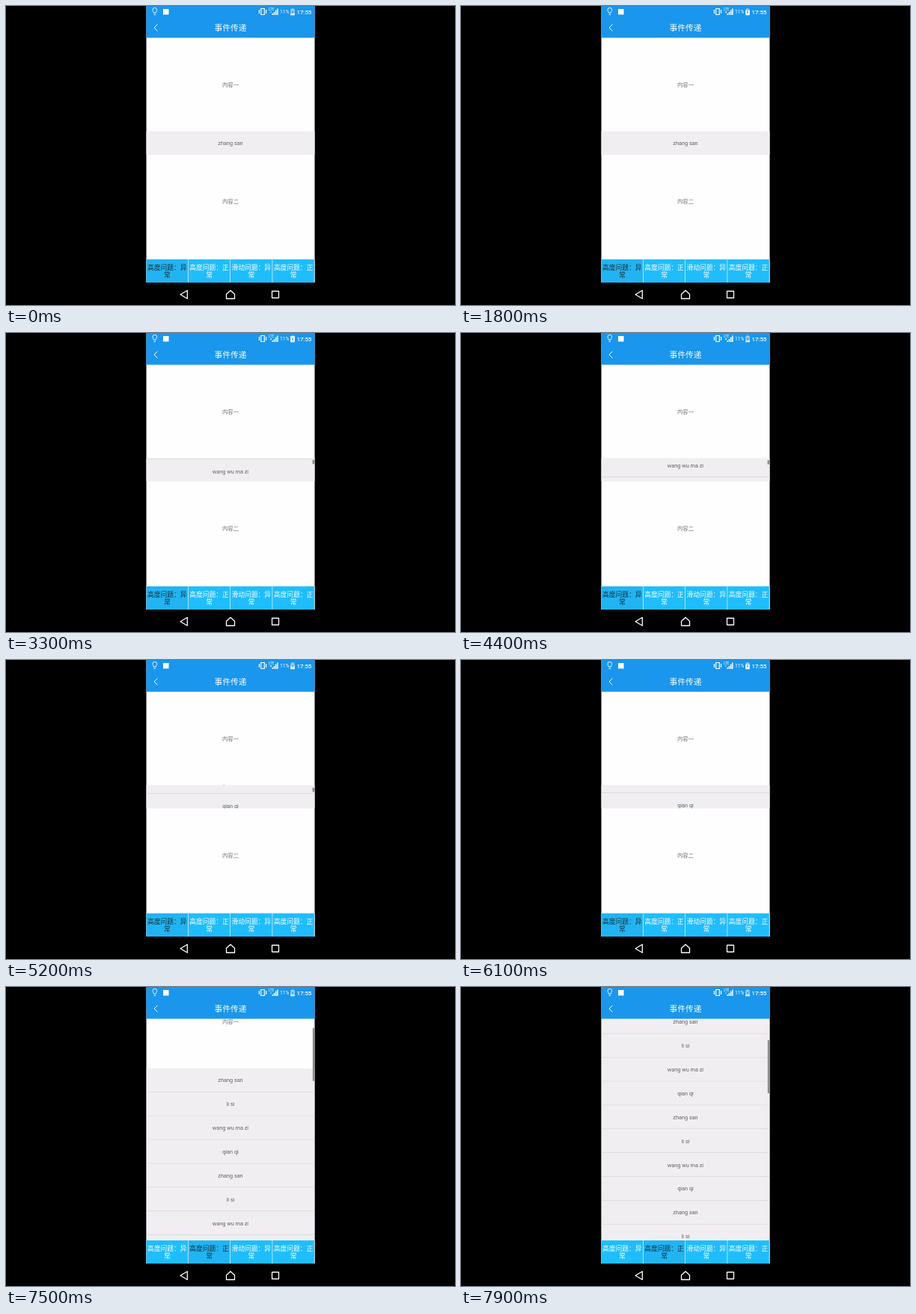
An HTML page for the animation above (8000 ms loop, 600 px wide and 400 px high).

```html
<!DOCTYPE html>
<html lang="zh-CN">
<head>
<meta charset="utf-8">
<style>
  html, body { margin: 0; width: 100%; height: 100%; overflow: hidden; background: #000; }
  svg { display: block; }
  text { font-family: Roboto, "Noto Sans CJK SC", "Noto Sans CJK", sans-serif; text-anchor: middle; }
  .item { font-size: 7.3px; fill: #626164; }
  .label { font-size: 7.4px; fill: #747474; }
  .tab text { font-size: 8.75px; fill: #fff; }
  .tab rect { fill: #20bdfd; }
  .tab.on text { fill: #15303c; }
  .tab.on rect { fill: #22b4f2; }
  .line { fill: none; stroke: #fff; }
</style>
</head>
<body>
<svg width="600" height="400" viewBox="0 0 600 400">
  <rect width="600" height="400"/>
  <rect x="187.5" width="225" height="370" fill="#fefefe"/>

  <g id="fixed">
    <text class="label" x="300" y="107.8">内容一</text>
    <text class="label" x="300" y="264.3">内容二</text>
    <svg x="187.5" y="167.5" width="225" height="31">
      <rect width="225" height="31" fill="#f0eef1"/>
      <g id="smallList"></g>
    </svg>
    <rect id="smallBar" x="409.5" width="3" height="5.5" fill="#8c8b8d"/>
  </g>

  <g id="full">
    <svg x="187.5" y="42.5" width="225" height="296">
      <g id="page">
        <text class="label" x="112.5" y="65.3">内容一</text>
        <g id="longList" transform="translate(0 125)"></g>
      </g>
    </svg>
    <rect id="longBar" x="409.8" width="2.7" height="71" fill="#8c8b8d"/>
  </g>

  <rect x="187.5" width="225" height="42.5" fill="#1a96ec"/>
  <path class="line" d="M202.5 24.5l-4.5 4.5 4.5 4.5"/>
  <text x="300" y="33" font-size="10.7" fill="#fff">事件传递</text>

  <g id="status" fill="#fff">
    <path class="line" stroke-width=".9" d="M197.4 9.3C197.4 7.5 196 7.2 196 5.2a2.8 2.8 0 0 1 5.6 0C201.6 7.2 200.200 7.5 200.200 9.300zM197.600 11.600h2.400"/>
    <rect x="210" y="4" width="7.500" height="7.500"/>
    <path class="line" stroke-width="1.200" d="M340.700 3.500h4.600v8h-4.600zM338.400 5v5M347.600 5v5"/>
    <text x="354.500" y="6" font-size="4.600">LTE</text>
    <path id="arrows" d="M352.500 7.500h3l-1.500 2z"/>
    <path d="M355.500 10h1.500v2h-1.500zM357.700 8h1.500v4h-1.500zM359.900 5.600h1.500v6.400h-1.500zM362.100 3.500h1.500v8.500h-1.500z"/>
    <text x="372.300" y="10.300" font-size="6.700">11%</text>
    <path fill-opacity=".55" d="M380.300 4.300h1.400v-1h2.600v1h1.400v7.900h-5.400z"/>
    <rect id="charge" x="380.300" width="5.400"/>
    <path d="M383.600 5.600l-2 3h1.200l-.4 2.400 2-3.200h-1.200z" fill="#1a96ec"/>
    <text x="398.400" y="10.700" font-size="7.800" font-weight="500">17:55</text>
  </g>

  <rect x="187.500" y="338.500" width="225" height="31.500" fill="#d9f3ff"/>
  <g id="tabs"></g>

  <rect x="187" y="370" width="226" height="30"/>
  <g class="line" stroke-width="1.300" stroke-linejoin="round">
    <path d="M242.300 380.500v11l-9.300-5.500z"/>
    <path d="M294.500 385.500l5.500-5 5.500 5v6h-11z"/>
    <path d="M355.500 381.500h9v9h-9z"/>
  </g>
</svg>
<script>
const $ = id => document.getElementById(id);
const set = (id, attrs) => {
  for (const k in attrs) $(id).setAttribute(k, attrs[k]);
};

const LOOP = 8000, STEP = 100, ROW = 31.87;
const names = ['zhang san', 'li si', 'wang wu ma zi', 'qian qi'];
const tabs = ['高度问题：异', '高度问题：正', '滑动问题：异', '高度问题：正'];

const rows = Array.from({ length: 16 }, (_, i) => {
  const y = i * ROW;
  return `<rect y="${y}" width="225" height="${ROW + .3}" fill="#f0eef1"/>
    <rect y="${y + ROW - .9}" width="225" height=".8" fill="#d8d6d9"/>
    <text class="item" x="112.5" y="${y + 18.4}">${names[i % 4]}</text>`;
}).join('');
$('smallList').innerHTML = $('longList').innerHTML = rows;

$('tabs').innerHTML = tabs.map((label, i) => {
  const x = 187.5 + i * 56.25;
  return `<g class="tab"><rect x="${x}" y="339" width="55.5" height="31"/>
    <text x="${x + 27.8}" y="353.2">${label}</text>
    <text x="${x + 27.8}" y="363.2">常</text></g>`;
}).join('');

// Linear interpolation through [time, value] points
function track(points, t) {
  let [t0, v0] = points[0];
  for (const [t1, v1] of points) {
    if (t < t1) return t <= t0 ? v0 : v0 + (v1 - v0) * (t - t0) / (t1 - t0);
    [t0, v0] = [t1, v1];
  }
  return v0;
}

const smallScroll = [[2000, 0], [2700, 54], [2900, 59], [3300, 62],
  [4100, 62], [4400, 70], [5000, 82], [5200, 84], [5400, 85]];
const smallFade = [[2000, 0], [2100, 1], [3400, 1], [3800, 0],
  [4100, 0], [4200, 1], [5700, 1], [6100, 0]];
const longScroll = [[7200, 0], [7900, 136.5]];

function draw(now) {
  const t = Math.floor(now % LOOP / STEP) * STEP;
  const second = t >= 6400;
  $('fixed').style.display = second ? 'none' : '';
  $('full').style.display = second ? '' : 'none';
  [...$('tabs').children].forEach((tab, i) => tab.classList.toggle('on', i === +second));

  const s = track(smallScroll, t), l = track(longScroll, t);
  set('smallList', { transform: `translate(0 ${-s})` });
  set('smallBar', { y: 166.7 + s * .05, opacity: track(smallFade, t) });
  set('page', { transform: `translate(0 ${-l})` });
  set('longBar', { y: 42.5 + l * .21, opacity: t > 7200 ? 1 : 0 });

  const level = 2 + Math.floor(t / 900) % 4 * 2;
  set('charge', { y: 12.2 - level, height: level });
  set('arrows', { opacity: t >= 300 && t < 5600 ? 1 : .5 });
  requestAnimationFrame(draw);
}
requestAnimationFrame(draw);
</script>
</body>
</html>
```
